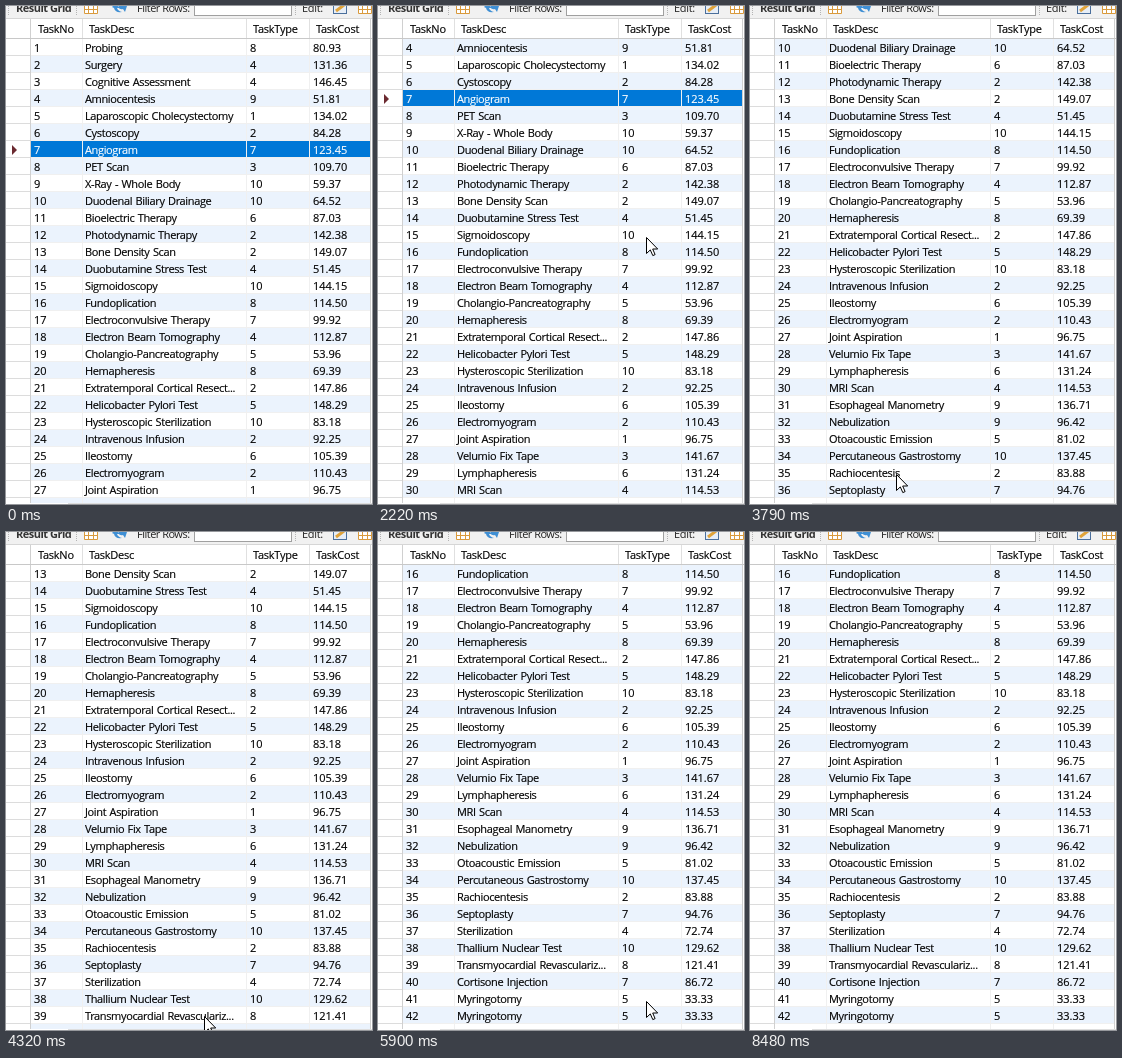
An HTML page for the animation above (9.61 s loop, 366 by 498 pixels).

```html
<!DOCTYPE html>
<html lang="en">
<head>
<meta charset="utf-8">
<title>Result grid</title>
<style>
  html, body { margin: 0; width: 100%; height: 100%; overflow: hidden; background: #fff; }
  #stage {
    position: absolute; left: 0; top: 0; width: 366px; height: 498px; overflow: hidden;
    background: #fff; color: #000;
    font: 11px "Open Sans", "Noto Sans", sans-serif;
    -webkit-text-stroke: .15px currentColor;
  }
  #stage > * { position: absolute; }
  #bar { left: 0; top: 0; -webkit-text-stroke: 0; }
  #head { left: 0; top: 13px; width: 366px; height: 20px; line-height: 20px; letter-spacing: -.25px; }
  #head span { position: absolute; white-space: pre; }
  #view { left: 0; top: 33px; width: 365px; height: 464px; overflow: hidden; }
  .row { position: relative; height: 17px; line-height: 17px; }
  .row span { position: absolute; top: 0; white-space: pre; }
  .row .desc { letter-spacing: -.36px; word-spacing: .9px; }
  .row::before {
    content: ""; position: absolute; left: 25px; width: 339px; height: 16px;
    border-bottom: 1px solid #f0f0f0;
  }
  .row::after {
    content: ""; position: absolute; left: 0; top: 16px; width: 24px; height: 1px; background: #dcdcdc;
  }
  .row:nth-child(even)::before { background: #ebf3fd; }
  .row.picked { color: #fff; }
  .row.picked::before { background: #0078d7; }
  .mark {
    position: absolute; left: 6px; top: 4px; width: 0; height: 0;
    border: solid transparent; border-width: 5px 0 5px 5px;
  }
  .line { width: 1px; top: 13px; height: 484px; background: #f0f0f0; }
  .line.edge { background: #d0d0d0; }
  .line:not(.edge) { border-top: 19px solid #e0e0e0; height: 465px; width: 1px; box-sizing: content-box; }
  #rule { left: 0; top: 32px; width: 366px; height: 1px; background: #c8c8c8; }
  #foot { left: 62px; top: 497px; width: 304px; height: 1px; background: #dedede; }
  #cursor { left: -1px; top: 0; }
</style>
</head>
<body>
<div id="stage">
  <svg id="bar" width="366" height="13">
    <rect width="366" height="12" fill="#f1f1f1"/>
    <path d="M0 12.5H366" stroke="#d6d6d6"/>
    <path d="M2.5 0V9M70.5 0V9M289.5 0V9" stroke="#b4b4b4" stroke-dasharray="1 1"/>
    <text x="10" y="6" font-weight="700" letter-spacing="-.5" fill="#333">Result Grid</text>
    <text x="131" y="6" letter-spacing="-.5" fill="#222">Filter Rows:</text>
    <text x="296" y="6" letter-spacing="-.3" fill="#222">Edit:</text>
    <rect x="188.5" y="-4.5" width="97" height="14" fill="#fff" stroke="#a0a0a0"/>
    <g fill="#fff" stroke="#d99a3d">
      <path id="sheet" d="M78.5 -2V7.5H91.5V-2M78.5 3.5H91.5M82.5 -2V7.5M87.5 -2V7.5"/>
      <use href="#sheet" x="274"/>
    </g>
    <path d="M106 1L110 -3L113 2H111Q112 5 116 6Q109 7 108 2ZM113 0H121L119 6L117 3Q114 4 112 1Z" fill="#3f8fd4"/>
    <rect x="327.5" y="-3.5" width="13" height="11" fill="#e7eef7" stroke="#4a6f9c"/>
    <path d="M330 5L338 -1" stroke="#e0a33a" stroke-width="3"/>
  </svg>
  <div id="head"></div>
  <div id="view"><div id="list"></div></div>
  <div id="rule"></div>
  <div id="foot"></div>
  <svg id="cursor" width="14" height="22">
    <path d="M.5 .5V16.5L4.3 12.9L6.8 18.6L9.1 17.6L6.7 12H11.7Z" fill="#fff" stroke="#000"/>
  </svg>
</div>
<script>
const LOOP = 9610, ROW = 17, STEP = 69.5, PICKED = 7;

const TASKS = `Probing|8|80.93
Surgery|4|131.36
Cognitive Assessment|4|146.45
Amniocentesis|9|51.81
Laparoscopic Cholecystectomy|1|134.02
Cystoscopy|2|84.28
Angiogram|7|123.45
PET Scan|3|109.70
X-Ray - Whole Body|10|59.37
Duodenal Biliary Drainage|10|64.52
Bioelectric Therapy|6|87.03
Photodynamic Therapy|2|142.38
Bone Density Scan|2|149.07
Duobutamine Stress Test|4|51.45
Sigmoidoscopy|10|144.15
Fundoplication|8|114.50
Electroconvulsive Therapy|7|99.92
Electron Beam Tomography|4|112.87
Cholangio-Pancreatography|5|53.96
Hemapheresis|8|69.39
Extratemporal Cortical Resect...|2|147.86
Helicobacter Pylori Test|5|148.29
Hysteroscopic Sterilization|10|83.18
Intravenous Infusion|2|92.25
Ileostomy|6|105.39
Electromyogram|2|110.43
Joint Aspiration|1|96.75
Velumio Fix Tape|3|141.67
Lymphapheresis|6|131.24
MRI Scan|4|114.53
Esophageal Manometry|9|136.71
Nebulization|9|96.42
Otoacoustic Emission|5|81.02
Percutaneous Gastrostomy|10|137.45
Rachiocentesis|2|83.88
Septoplasty|7|94.76
Sterilization|4|72.74
Thallium Nuclear Test|10|129.62
Transmyocardial Revasculariz...|8|121.41
Cortisone Injection|7|86.72
Myringotomy|5|33.33
Myringotomy|5|33.33`.split("\n").map(line => line.split("|"));

// Each wheel notch moves the list by three rows.
const NOTCHES = [2220, 2550, 3520, 4320, 5070];

const smooth = k => k * k * (3 - 2 * k);
const cubic = k => k ** 3;

// The pointer goes from one leg's end to the next, swinging sideways on the way.
const ENTRY = { x: 166, y: 490 };
const LEGS = [
  { from: 130, to: 1040, x: 312, y: 133, swing: 90 },
  { from: 1040, to: 2220, x: 269, y: 231, swing: -95 },
  { from: 2750, to: 3310, x: 254, y: 432 },
  { from: 3310, to: 4060, x: 199, y: 484, swing: -75 },
  { from: 4320, to: 4870, x: 173, y: 484 },
  { from: 5140, to: 5900, x: 269, y: 469 },
  { from: 5900, to: 8480, x: 269, y: 500, swing: -56, turns: 6, ease: cubic }
];

const $ = id => document.getElementById(id);
const span = (x, text, kind = "") => `<span class="${kind}" style="left:${x}px">${text}</span>`;

$("head").innerHTML = span(32, "TaskNo") + span(83, "TaskDesc") + span(247, "TaskType") + span(310, "TaskCost");

$("list").innerHTML = TASKS.map(([desc, type, cost], i) => {
  const picked = i + 1 === PICKED;
  return `<div class="row ${picked ? "picked" : ""}">${picked ? '<div class="mark"></div>' : ""}
    ${span(28, i + 1)}${span(79, desc, "desc")}${span(244, type)}${span(307, cost)}</div>`;
}).join("");

for (const x of [24, 76, 240, 303, 364]) {
  const edge = x === 24 || x === 364 ? "edge" : "";
  $("rule").insertAdjacentHTML("beforebegin", `<div class="line ${edge}" style="left:${x}px"></div>`);
}

const mark = document.querySelector(".mark");

function pointer(t) {
  let { x, y } = ENTRY;
  for (const { from, to, x: endX, y: endY, swing = 0, turns = 1, ease = smooth } of LEGS) {
    if (t < from) break;
    const steps = Math.round((to - from) / STEP);
    const k = Math.min(1, Math.floor((t - from) / (to - from) * steps + 1e-6) / steps);
    x += (endX - x) * ease(k) + swing * Math.sin(Math.PI * turns * k);
    y += (endY - y) * ease(k);
  }
  return `translate(${Math.round(x)}px, ${Math.round(y)}px)`;
}

function render(t) {
  const scrolled = 3 * NOTCHES.filter(time => time <= t).length;
  $("list").style.transform = `translateY(${-scrolled * ROW}px)`;
  mark.style.borderLeftColor = scrolled < 6 ? "#6b2a30" : "#2f3557";
  $("cursor").style.visibility = t >= LEGS[0].from ? "visible" : "hidden";
  $("cursor").style.transform = pointer(t);
}

const start = performance.now();
function tick() {
  render((performance.now() - start) % LOOP);
  requestAnimationFrame(tick);
}
tick();
</script>
</body>
</html>
```
